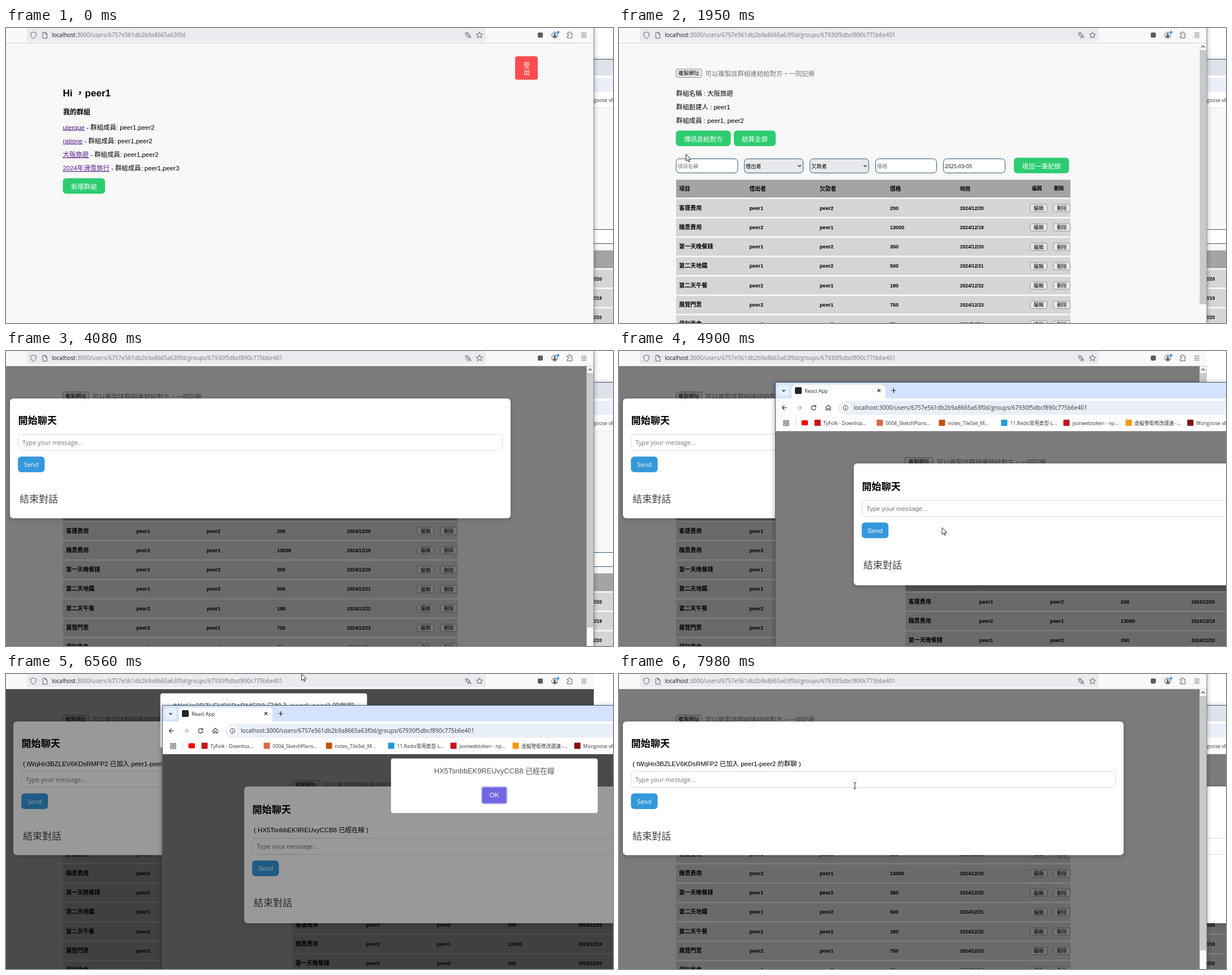
These frames come from a looping animation (1073 px wide and 522 px high, 8 s). An HTML page:

```html
<!DOCTYPE html>
<html lang="zh-Hant">
<head>
<meta charset="utf-8">
<title>Group ledger chat</title>
<style>
html, body { margin: 0; width: 100%; height: 100%; overflow: hidden; background: #fff; }
svg { display: block; }
text { white-space: pre; font-family: "Liberation Sans", Arial, "Noto Sans CJK TC", "Noto Sans CJK", sans-serif; }
.ui { font-family: "Open Sans", "Noto Sans", "Noto Sans CJK TC", sans-serif; }
.b { font-weight: bold; }
.light { font-weight: 300; }
.mid { text-anchor: middle; }
.link { fill: #551a8b; text-decoration: underline; }
.window { filter: drop-shadow(0 2px 4px #0006); }
</style>
</head>
<body>
<svg id="stage" width="1073" height="522" viewBox="0 0 1073 522"><g id="windows"></g><g id="cursor"></g></svg>
<script>
const LOOP = 8000;
const T = { move: 460, open: 1270, rows: 1950, foxChat: 2750, chromeFront: 4130,
            chromeChat: 4770, joined: 5030, foxFront: 6760, close: 7570 };
const USER_URL = ':3000/users/6757e561db2b9a8665a63f0d';
const GROUP_URL = USER_URL + '/groups/67930f5dbcf890c775b6e401';
const $ = id => document.getElementById(id);

// Drawing helpers
const rect = (x, y, w, h, fill, r = 0, more = '') =>
  `<rect x="${x}" y="${y}" width="${w}" height="${h}" fill="${fill}" rx="${r}" ${more}/>`;
const text = (x, y, str, size = 11.4, fill = '#000', cls = '') =>
  `<text x="${x}" y="${y}" font-size="${size}" fill="${fill}" class="${cls}">${str}</text>`;
const stroke = (d, color = '#5b5b66', w = 1) =>
  `<path d="${d}" fill="none" stroke="${color}" stroke-width="${w}"/>`;
const ring = (x, y, r, color = '#5b5b66') =>
  `<circle cx="${x}" cy="${y}" r="${r}" fill="none" stroke="${color}"/>`;
const group = (body, x = 0, y = 0, id = '') => `<g id="${id}" transform="translate(${x} ${y})">${body}</g>`;
const border = color => `stroke="${color}" stroke-width="1"`;

const greenButton = (x, y, w, label) =>
  rect(x, y, w, 27.5, '#2ecc71', 6) + text(x + w / 2, y + 19, label, 11.4, '#fff', 'mid');
const smallButton = (x, y, w, h, label, size) =>
  rect(x, y, w, h, '#e9e9ed', 2.5, border('#8f8f9d')) + text(x + w / 2, y + h / 2 + 3.4, label, size, '#000', 'mid');
const field = (x, w, label, fill, color) =>
  rect(x, 231.5, w, 25, fill, 6, border('#2b5a78')) + text(x + 2.5, 247.7, label, 9.2, color, 'ui');
const select = (x, label) =>
  field(x, 104, label, '#e9e9ed', '#000') + stroke(`M${x + 95} 242.5l2.7 2.8 2.7-2.8`, '#222', 1.2);

const records = [
  ['客運費用', 1, 200, 20], ['機票費用', 2, 13000, 19], ['第一天晚餐錢', 1, 350, 20],
  ['第二天地鐵', 1, 500, 21], ['第二天午餐', 2, 180, 22], ['展覽門票', 2, 750, 23], ['便利零食', 1, 50, 24],
];

function table(id, pitch) {
  const col = k => 106.3 + pitch * k;
  const head = rect(101, 268.5, 697, 31.5, '#a4a4a4') +
    ['項目', '借出者', '欠款者', '價格', '時間'].map((s, k) => text(col(k), 288, s, k > 3 ? 9 : 9.8, '#000', 'b')).join('') +
    text(730, 287, '編輯', 8.8, '#000', 'b') + text(769, 287, '刪除', 8.8, '#000', 'b');
  const rows = records.map(([item, lender, price, day], i) => {
    const y = 302.7 + 34.3 * i, cell = (k, s, size = 9.2) => text(col(k), y + 18.8, s, size, '#000', 'b');
    return rect(101, y, 697, 31.5, '#d5d5d4') + cell(0, item, 10) + cell(1, 'peer' + lender) +
      cell(2, 'peer' + (3 - lender)) + cell(3, price) + cell(4, '2024/12/' + day, 8.3) +
      smallButton(727, y + 9.3, 29.5, 13, '編輯', 8.8) + smallButton(768, y + 9.3, 29.5, 13, '刪除', 8.8);
  }).join('');
  return head + group(rows, 0, 0, id + '-rows');
}

function groupPage(id, { dx, top, mid, form, pitch, copyWidth }) {
  return group(smallButton(101, 72.5, copyWidth, 15, '複製網址', 9.3) +
      text(107.5 + copyWidth, 84.5, '可以複製該群組連結給對方，一同記帳', 11.4, '#757575'), dx, top) +
    group(text(101, 120, '群組名稱 : 大阪旅遊') + text(101, 144, '群組創建人 : peer1') +
      text(101, 168, '群組成員 : peer1, peer2') +
      greenButton(100.5, 181.5, 97, '傳訊息給對方') + greenButton(203, 181.5, 74, '結算全部'), dx, mid) +
    group(field(101, 109, '項目名稱', '#fff', '#757575') + select(221.5, '借出者') + select(337.5, '欠款者') +
      field(453.5, 108, '價格', '#fff', '#757575') + field(573.5, 109, '2025-03-05', '#fff', '#000') +
      greenButton(698, 229.5, 97.5, '增加一筆紀錄') + table(id, pitch), dx && dx + 1, form);
}

// Chat dialog, with its own origin at the top left corner
function chat(id, { pad, cls, size, message }) {
  const lower = rect(14.5, 63.5, 856, 28.5, '#fff', 6, border('#dcdcdc')) +
    text(22, 82, 'Type your message...', size, '#757575', cls) +
    rect(14.1, 102.8, 47.2, 27.8, '#3498db', 6) + text(37.7, 121, 'Send', size, '#fff', cls + ' mid') +
    text(17, 184, '結束對話', 17, '#444', 'light');
  return group(rect(0, 0, 885, 212, '#fff', 6, `id="${id}-box" style="filter:drop-shadow(0 2px 4px #0003)"`) +
    group(text(14.5, 45, '開始聊天', 17.1, '#000', 'b') +
      group(text(17, 79, message), 0, 0, id + '-message') + group(lower, 0, 0, id + '-lower'), 0, pad), 0, 0, id + '-chat');
}

const notice = (id, message) => group(
  rect(-182.7, -48.2, 365.4, 96.5, '#fff', 4) + text(0, -22, message, 12.86, '#545454', 'mid') +
  rect(-23.2, 1.2, 46.4, 31.6, '#b7b2ef', 4.5) + rect(-21.2, 3.2, 42.4, 27.6, '#7066e0', 3) +
  text(0, 20.8, 'OK', 11.6, '#fff', 'mid'), 0, 0, id + '-notice');

// Page area: content, chat backdrop, chat, notice backdrop, notice
function viewport(id, [x, y, w, h], content, win) {
  return `<svg x="${x}" y="${y}" width="${w}" height="${h}" viewBox="${x} ${y} ${w} ${h}">` +
    rect(x, y, w, h, '#f8f8f8') + content +
    rect(x, y, w, h, '#000', 0, `id="${id}-dim" opacity=".5"`) + chat(id, win) +
    rect(x, y, w, h, '#000', 0, `id="${id}-veil"`) + notice(id, win.notice) + '</svg>';
}

const wins = {
  fox: { dx: 0, top: 0, mid: 0, form: 0, pitch: 124.2, copyWidth: 45, pad: 0, cls: 'ui', size: 10.9,
    message: '( tWqHn3BZLEV6KDsRMFP2 已加入 peer1-peer2 的群聊 )', notice: 'tWqHn3BZLEV6KDsRMFP2 已加入 peer1-peer2 的群聊',
    x: 7, y: 84, height: 212, grow: 24.5, nx: 455.5, ny: 82.5, popAt: 5050 },
  chrome: { dx: 404.5, top: 116, mid: 120, form: 125, pitch: 125, copyWidth: 49.5, pad: 1.7, cls: '', size: 11.4,
    message: '( HX5TsnbbEK9REUvyCCB8 已經在線 )', notice: 'HX5TsnbbEK9REUvyCCB8 已經在線',
    x: 415, y: 199, height: 215.5, grow: 26.5, nx: 863.2, ny: 197.6, popAt: 5014 },
};

function homePage() {
  const item = (y, name, members) =>
    text(100.5, y, `<tspan class="link">${name}</tspan> - 群組成員: ${members}`);
  return rect(900, 50, 40, 41.5, '#ff4d4f', 4) + text(920.5, 70, '登', 11.4, '#fff', 'mid') +
    text(920.5, 83, '出', 11.4, '#fff', 'mid') +
    text(100.5, 121, 'Hi ，peer1', 17.1, '#000', 'b') + text(101, 152.5, '我的群組', 12, '#000', 'b') +
    item(179.5, 'uterque', 'peer1,peer2') + item(203.8, 'ratione', 'peer1,peer2') +
    item(228, '大阪旅遊', 'peer1,peer2') + item(252.3, '2024年滑雪旅行', 'peer1,peer3') +
    greenButton(100.5, 265.7, 74.5, '新增群組');
}

function foxWindow() {
  const icons = stroke('M48.500 7l5 2c0 5-1.500 7.500-5 9.500c-3.500-2-5-4.500-5-9.500z') +
    stroke('M65 7.500h4.500l3 3v7.500h-7.500zM69.500 7.500v3h3') +
    stroke('M811 9h7M814.500 7.500v1.500M812 14c3-1 4.500-3 5-5M812.500 10c1 2 2.500 3.500 4 4M816 18l3-7 3 7M817 16h4') +
    stroke('M837 7l1.600 3.500 3.900.4-2.900 2.600.8 3.800-3.400-2-3.400 2 .8-3.800-2.900-2.600 3.900-.4z') +
    rect(940, 8, 9, 9, '#5b5b66', 2) +
    ring(970, 12.5, 5.3) + '<circle cx="970" cy="11" r="1.900" fill="#5b5b66"/><path d="M966.500 15.500a3.500 2.500 0 0 1 7 0l-3.500 1.500z" fill="#5b5b66"/>' +
    '<circle cx="976" cy="7.500" r="2.300" fill="#2a9df4"/>' +
    stroke('M992 17.500v-3.500h1.500a1.500 1.500 0 0 0 0-3h-1.500v-2h2.500a1.700 1.700 0 1 1 3 0h3v8.500z') +
    stroke('M1017 9h9M1017 12.500h9M1017 16h9');
  const scrollbar = rect(1026.5, 27, 12, 495, '#f9f9fa') + rect(1026.5, 39, 12, 450, '#c9c9c9') +
    stroke('M1029.500 34.500l3-3 3 3', '#555', 1.4);
  const content = group(homePage(), 0, 0, 'fox-home') + group(groupPage('fox', wins.fox), 0, 0, 'fox-group');
  return `<g id="fox">` + rect(-20, -20, 1059, 570, '#f9f9fb', 0, 'id="fox-frame" class="window"') +
    rect(37, -6, 811, 29.5, '#ebebef', 4) + rect(0, 26, 1039, 1, '#cfcfd4') + icons +
    text(81, 16, '<tspan fill="#15141a">localhost</tspan><tspan id="fox-url"></tspan>', 10, '#74747c', 'ui') +
    viewport('fox', [0, 27, 1039, 495], content, wins.fox) +
    group(scrollbar, 0, 0, 'fox-bar') + rect(1038.5, 0, 1, 522, '#8a8a8f', 0, 'id="fox-edge"') + '</g>';
}

function chromeWindow() {
  const marks = [
    [351, '#c8141c', 'TyFolk - Downloa...'], [461, '#d9694a', '0004_SketchPlans...'], [571, '#c8500a', 'notes_TileSet_M...'],
    [681, '#1d9bd8', '11.Redis常用类型-L...'], [791, '#c4161c', 'jsonwebtoken - np...'],
    [901, '#f29900', '虛擬警衛修改建議 -...'], [1010, '#8a1010', 'Mongoose v8.9.0: ...'],
  ].map(([x, color, name]) => rect(x - 5.5, 121.5, 11, 11, color, 1) + text(x + 10.3, 130.8, name, 8.7, '#333', 'ui')).join('');
  const grid = [0, 1, 2, 3].map(i => rect(291 + i % 2 * 5.5, 123 + (i >> 1) * 5.5, 3.5, 3.5, 'none', 0, border('#444'))).join('');
  const icons = stroke('M288.500 69l2.500 2.500 2.500-2.500', '#222', 1.3) +
    stroke('M457 67.500l5 5M462 67.500l-5 5M481.500 70h8M485.500 66v8', '#222', 1.2) +
    stroke('M297 100.500h-8M292.500 96.500l-4 4 4 4', '#333', 1.2) + stroke('M314 100.500h8M318.500 96.500l4 4-4 4', '#aaa', 1.2) +
    stroke('M347.300 98a4 4 0 1 0 .7 3.500M348 96v2.700h-2.800', '#333', 1.2) +
    stroke('M366 104.500v-5l4-3.500 4 3.500v5h-2.700v-3h-2.600v3z', '#333', 1.1) +
    '<circle cx="400.500" cy="100.500" r="9" fill="#fff"/>' + ring(400.5, 100.5, 4.3, '#333') +
    stroke('M400.500 98v1M400.500 100v3', '#333');
  return `<g id="chrome">` + rect(276.5, 55.5, 830, 500, '#fff', 0, 'class="window" stroke="#46607d"') +
    rect(277, 56, 800, 28, '#d3e3fd', 0, 'id="strip"') + rect(280.5, 60, 21, 20, '#e9f1fe', 6) +
    rect(305, 59.5, 166, 30, '#fff', 7) + rect(277, 84, 800, 58, '#fff') +
    rect(311, 64, 12, 12, '#20232a', 2) + text(328, 73.8, 'React App', 8.8, '#222', 'ui') +
    rect(388, 88, 720, 25, '#eaf0fa', 12.5) + icons + text(415, 104.3, 'localhost' + GROUP_URL, 10.15, '#333', 'ui') +
    grid + rect(312, 121, 1, 12, '#c5d5ee') + rect(322.5, 122.5, 11.5, 9, '#f00', 2) + marks +
    rect(277, 141, 800, 1, '#dfe3ea') +
    viewport('chrome', [277, 142, 800, 380], groupPage('chrome', wins.chrome), wins.chrome) + '</g>';
}

$('windows').innerHTML = chromeWindow() + foxWindow();
$('cursor').innerHTML =
  '<path id="arrow" d="M.5.5v12l2.800-2.500 1.900 4.200 1.900-.9-1.900-4h3.800z" fill="#fff" stroke="#111" stroke-width=".9"/>' +
  '<path id="ibeam" d="M-2.500-5h2l.5.500.5-.5h2M0-4.500v10M-2.500 6h2l.5-.5.5.500h2" fill="none" stroke="#222"/>';

// Pointer stops: time, x, y
const stops = [
  [460, 922, 454], [1000, 110, 195], [1200, 118, 223], [2290, 118, 223], [2560, 150, 200], [2750, 150, 200],
  [3050, 190, 196], [3600, 190, 196], [3950, 48, 526], [4130, 330, 530], [4350, 598, 318], [4480, 512, 268],
  [4630, 570.5, 312], [5150, 570.5, 312], [5550, 760, 222], [5850, 953, 180], [6360, 533, 24], [6500, 522, -1],
  [6760, 522, -1], [7480, 417, 197], [LOOP, 417, 197],
];

const clamp = v => Math.min(1, Math.max(0, v));
const mix = (a, b, k) => a + (b - a) * k;
const show = (id, on) => { $(id).style.display = on ? '' : 'none'; };
const move = (id, x, y, s = 1) => $(id).setAttribute('transform', `translate(${x} ${y}) scale(${s})`);

function popScale(age) {
  const keys = [[0, .7], [135, 1.05], [240, .95], [300, 1]];
  if (age >= 300) return 1;
  const i = Math.max(1, keys.findIndex(k => k[0] > age));
  const [a, from] = keys[i - 1], [b, to] = keys[i];
  return mix(from, to, 1 - (1 - clamp((age - a) / (b - a))) ** 2.2);
}

function updateWindow(id, t, chatAt) {
  const w = wins[id], joined = t >= T.joined, locked = joined && t < T.close + 130;
  const leaving = clamp((t - T.close) / 150);
  const open = t >= chatAt;
  show(id + '-dim', open);
  show(id + '-chat', open);
  move(id + '-chat', w.x + (locked ? 6 : 0), w.y);
  show(id + '-message', joined);
  move(id + '-lower', 0, joined ? w.grow : 0);
  $(id + '-box').setAttribute('height', w.height + (joined ? w.grow : 0));
  show(id + '-veil', joined && leaving < 1);
  $(id + '-veil').setAttribute('opacity', .4 * clamp((t - T.joined + 30) / 100) * (1 - leaving));
  show(id + '-notice', t >= w.popAt && leaving < 1);
  $(id + '-notice').setAttribute('opacity', 1 - leaving);
  move(id + '-notice', w.nx, w.ny, popScale(t - w.popAt) * (1 - leaving / 2));
  return locked;
}

function render(t) {
  const grouped = t >= T.open;
  show('fox-home', !grouped);
  show('fox-group', grouped);
  show('fox-rows', t >= T.rows);
  $('fox-url').textContent = grouped ? GROUP_URL : USER_URL;
  const locked = updateWindow('fox', t, T.foxChat);
  updateWindow('chrome', t, T.chromeChat);
  show('fox-bar', t >= T.rows && !locked);

  const chromeFront = t >= T.chromeFront && t < T.foxFront;
  const front = $(chromeFront ? 'chrome' : 'fox');
  if ($('windows').lastChild !== front) $('windows').append(front);
  $('strip').setAttribute('fill', chromeFront ? '#d3e3fd' : '#dde3ea');
  $('fox-frame').classList.toggle('window', !chromeFront);
  show('fox-edge', !chromeFront);

  show('cursor', t >= T.move);
  show('arrow', t < T.close);
  show('ibeam', t >= T.close);
  const i = Math.max(1, stops.findIndex(s => s[0] > t));
  const [t0, x0, y0] = stops[i - 1], [t1, x1, y1] = stops[i];
  const k = clamp((t - t0) / (t1 - t0)), ease = k * k * (3 - 2 * k);
  move('cursor', mix(x0, x1, ease), mix(y0, y1, ease));
}

const start = performance.now();
function tick() {
  render((performance.now() - start) % LOOP);
  requestAnimationFrame(tick);
}
tick();
</script>
</body>
</html>
```
